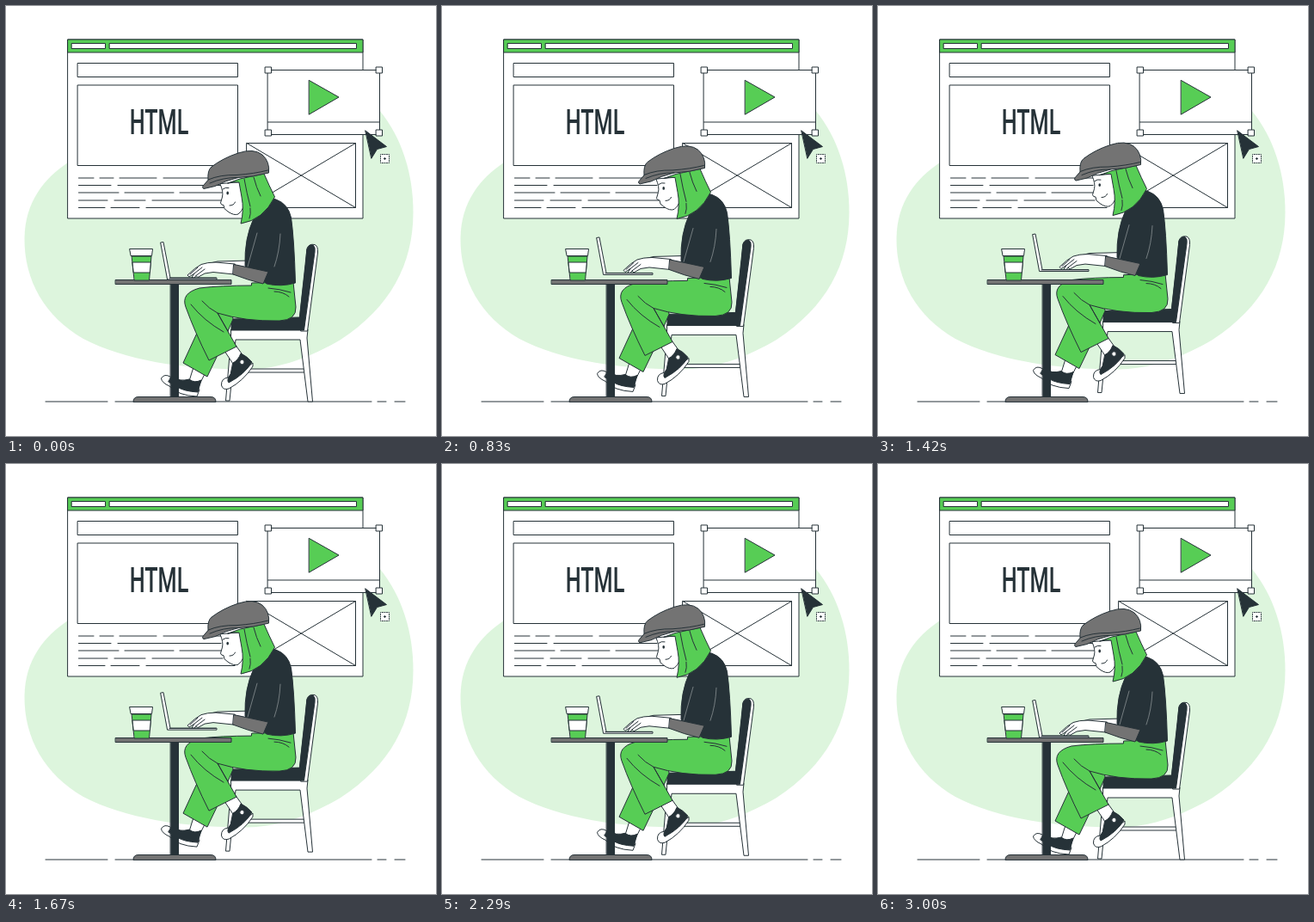
An HTML page that plays this animation: 500 px wide and 500 px high, repeating every 3.04 s.

```html
<!DOCTYPE html>
<html lang="en">
<head>
<meta charset="utf-8">
<title>Web designer at work</title>
<style>
  html, body { margin: 0; width: 100%; height: 100%; overflow: hidden; background: #fff; }
  svg { display: block; width: 100vw; height: 100vh; }
  .ink { stroke: #263238; stroke-width: 1; stroke-linejoin: round; stroke-linecap: round; fill: none; }
  .white { fill: #fff; }
  .green { fill: #57cd55; }
  .gray { fill: #737373; }
  .dark { fill: #263238; }
  .fold { stroke: #8a9194; stroke-width: .8; }
  .title { font: 500 41px Roboto, "Liberation Sans", sans-serif; text-anchor: middle; }
</style>
</head>
<body>
<svg viewBox="0 0 500 500">
  <path fill="#ddf5dd" d="M21.500 270C22 228 44 201 72 182C130 144 330 60 434 121C461 154 473.500 196 473.500 240C473.500 300 447 350 389 388C355 408 318 422.500 280 422.500C205 422.500 138 412 90 387C45 361 21 319 21.500 270Z"/>

  <g class="ink">
    <path d="M46 460H118M127 460H425M432 460H442M452 460H464"/>
    <path class="white" d="M72 39H415V247H72Z"/>
    <path class="green" d="M72 39H415V54H72Z"/>
    <path class="white" d="M76.500 43.500H115.500V49.500H76.500ZM120.500 43.500H407.500V49.500H120.500Z"/>
    <path d="M83.500 66.500H269.500V82.500H83.500ZM83.500 92H269.500V185.500H83.500Z"/>
    <path d="M84.500 200H102M109 200H125M132 200H175M183 200H252M84.500 208.500H122M130 208.500H250M84.500 217H131M138 217H195M202 217H251M84.500 226H118M126 226H162M170 226H252M84.500 234.500H115M122 234.500H155M163 234.500H266"/>
    <path class="white" d="M280 159.500H406.500V234.500H280ZL406.500 234.500M406.500 159.500L280 234.500"/>
    <path class="white" d="M304.500 74.500H434.500V149.500H304.500ZM304.500 135H434.500"/>
    <path class="green" d="M352.500 86.500L387 106L352.500 126Z"/>
    <g id="handles" class="white"></g>
    <path class="dark" d="M418 145L442.500 163.500L431.500 166.500L425 177Z"/>
    <path class="white" d="M435.500 172.500H445.500V182.500H435.500Z" stroke-dasharray="1.700 .8" stroke-dashoffset=".85" stroke-linecap="butt"/>
    <path d="M439.500 177.500H441.500M440.500 176.500V178.500"/>
  </g>
  <text class="title dark" transform="translate(178 149) scale(.615 1)">HTML</text>

  <g id="floating" class="ink">
    <!-- chair -->
    <path class="white" d="M264 422H347V426H264Z"/>
    <path class="white" d="M262 376H351L350 386L356.500 460H351L342 388H267L260 459H255.500L261.500 388Z"/>
    <path class="white" d="M350 282Q352 276 359 277.500Q363 279 362.500 287L350.500 378L343 378Z"/>
    <path class="dark" d="M350 283Q352 277 357 278Q360 280 359 286L346.500 377H262V364L341 362Z"/>

    <!-- far leg -->
    <path class="white" d="M218 420L213 436L224 442L231 428Z"/>
    <path class="white" d="M191 431Q184 427 180.500 433Q181 438 190 442Q200 453 222 454L225 446L200 434Z"/>
    <path class="dark" d="M192 432Q203 437 213 434Q219 439 227 435L223 449Q207 448 199 443L189 437Z"/>
    <path class="green" d="M236 350L206 415L234 431L246 406L264 364L262 350Z"/>

    <!-- near leg -->
    <path class="white" d="M254 401L264 416L276 407L266 393Z"/>
    <path class="white" d="M258 432Q250 433 250.500 441Q252 447 259 445Q276 436 287 419V415L270 428Z"/>
    <path class="dark" d="M264 415Q270 412 273 404Q280 407 286 414Q278 428 259 438Q256 435 261 428Z"/>
    <circle class="white" cx="274.500" cy="414" r="2.700"/>
    <path class="green" d="M286 322L334 321L337 350Q338 365 318 366Q278 367 246 357L268 396L236 412Q219 378 209 350Q203 334 225 328Q250 325 285 325Z"/>
    <path d="M215 347Q230 366 253 379M228 343Q236 352 246 357L258 378M312 332Q322 332 329 338M305 328Q318 329 331 333"/>

    <!-- laptop -->
    <path class="white" d="M180 275L183 274.500L191 316H245V318H188Z"/>
    <path d="M190 316.300H244"/>

    <!-- far arm -->
    <path class="white" d="M283 296L246 297L229 301L236 306L282 303Z"/>

    <!-- torso -->
    <path class="dark" d="M297 232Q306 221 314 225Q328 230 331.500 246Q335 270 336.500 322Q320 327 303 323L278 302Q277 270 288 247Z"/>
    <path class="fold" d="M292 264L281 303M319 265Q318 286 312 303"/>

    <!-- near arm -->
    <path class="white" d="M266 300L244 298Q234 298 227 300.500Q220 304 211 313L213 315L219 311L216 315.500L219 316L221 313.500L223 315.500L231 311L241 309.500L265 312Z"/>
    <path d="M219 311L228 304M221 313.500L231 306M214 312L223 304"/>
    <path class="gray" d="M265 300.500Q282 304 305 309L299 323Q282 319 264 312Z"/>

    <!-- head -->
    <path class="white" d="M249 207Q253 216 251.500 222L249.500 229Q250 231.500 253 231.500Q252.500 236 258 239Q265 244 270 242Q274 239 276 234L285 204Z"/>
    <path d="M252 213Q255 210.500 259 211.500M260 232Q265 232 266.500 228"/>
    <ellipse class="dark" cx="257.700" cy="217.500" rx="1.300" ry="1.900" stroke="none"/>
    <path class="green" d="M258 206L272 201L300 195Q306 209 312.500 222Q299 249 273 253Q277 237 274 222L271 205Q265 204 258 206Z"/>
    <path d="M277 201Q280 218 284 233M288 199Q291 211 296 221M284 235Q285 242 283 247"/>

    <!-- cap -->
    <path class="gray" d="M235 202Q234 191 239 187Q252 177 270 171Q288 165 298 173Q307 181 305.500 194Q287 199 270 199.500Q255 203 243 209.500L230 212.500Q227 211 230 208Z"/>
    <path d="M235 202Q249 196 268 196.500Q289 195 304.500 191M237 206Q253 199 270 199.500"/>
  </g>

  <!-- table and cup -->
  <g class="ink">
    <path class="dark" d="M191.500 323H200.500V455H191.500Z"/>
    <path class="gray" d="M127.500 318.500H262V323.500H127.500ZM148 460Q148 454.500 154 454.500H238Q244 454.500 244 460Z"/>
    <path class="green" d="M146.500 291H169L166.500 319H149.500Z"/>
    <path class="white" d="M147.300 298H168.300L167.300 310H148.600Z"/>
    <path class="white" d="M144 282.500H170.500L169.500 290.500H145.500Z"/>
  </g>
</svg>
<script>
  const LOOP = 3040, HALF = 1500, STEP = 1000 / 24, RISE = 10;
  const floating = document.getElementById("floating");

  document.getElementById("handles").innerHTML = [305, 434].flatMap(x =>
    [74.5, 147.5].map(y => `<rect x="${x - 3.5}" y="${y - 3.5}" width="7" height="7"/>`)
  ).join("");

  // Constant-speed rise and fall, held at 24 steps a second.
  function draw(ms) {
    const stepped = Math.min(2 * HALF, Math.floor((ms % LOOP + 5) / STEP) * STEP);
    const lift = RISE * (1 - Math.abs(1 - stepped / HALF));
    floating.setAttribute("transform", `translate(0 ${-lift})`);
  }

  let start;
  function tick(now) {
    start ??= now;
    draw(now - start);
    requestAnimationFrame(tick);
  }
  draw(0);
  requestAnimationFrame(tick);
</script>
</body>
</html>
```
